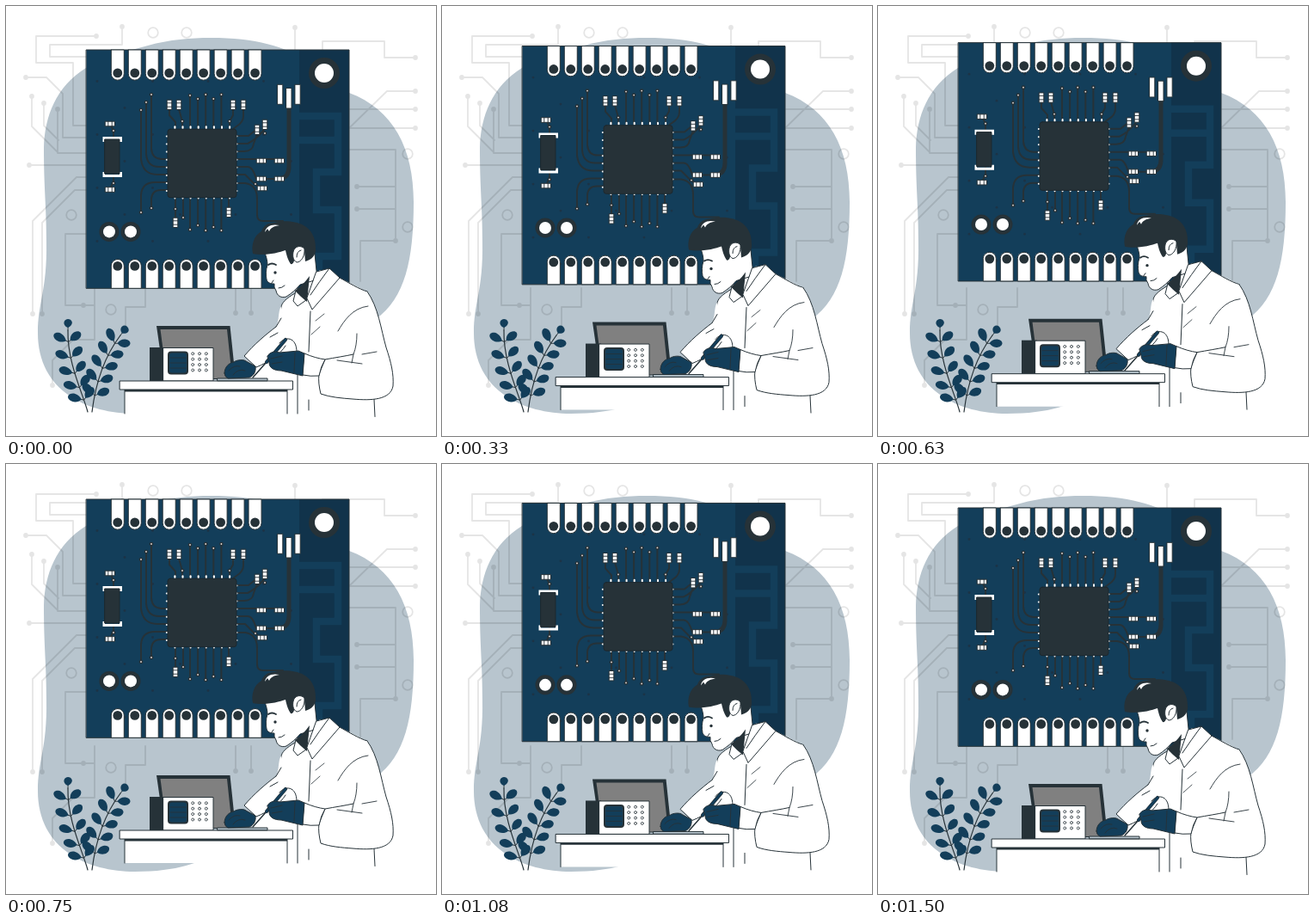
Write an HTML page with a canvas that moves like this. It is 500 by 500 pixels and loops after 1540 ms.

```html
<!DOCTYPE html>
<html lang="en">
<head>
<meta charset="utf-8">
<title>Electronics workbench</title>
<style>
html, body { margin: 0; width: 100%; height: 100%; overflow: hidden; background: #fff; }
canvas { display: block; width: 500px; height: 500px; }
</style>
</head>
<body>
<canvas id="stage" width="500" height="500"></canvas>
<script>
const INK = '#263238', NAVY = '#133e5a', DEEP = '#11334b', WHITE = '#fff';
const stage = document.getElementById('stage').getContext('2d');
let ctx = stage;

function shape(d, fill, stroke, width = 1) {
  const path = new Path2D(d);
  if (fill) { ctx.fillStyle = fill; ctx.fill(path); }
  if (stroke) {
    ctx.strokeStyle = stroke;
    ctx.lineWidth = width;
    ctx.stroke(path);
  }
}

const line = (d, color = INK, width = 1) => shape(d, null, color, width);

function box(x, y, w, h, fill, stroke, r = 0) {
  ctx.beginPath();
  ctx.roundRect(x, y, w, h, r);
  if (fill) { ctx.fillStyle = fill; ctx.fill(); }
  if (stroke) { ctx.strokeStyle = stroke; ctx.lineWidth = 1; ctx.stroke(); }
}

function dot(x, y, r, fill, stroke, width = 1) {
  ctx.beginPath();
  ctx.arc(x, y, r, 0, Math.PI * 2);
  if (fill) { ctx.fillStyle = fill; ctx.fill(); }
  if (stroke) { ctx.strokeStyle = stroke; ctx.lineWidth = width; ctx.stroke(); }
}

function layer(draw) {
  const canvas = document.createElement('canvas');
  canvas.width = canvas.height = 500;
  ctx = canvas.getContext('2d');
  ctx.lineJoin = ctx.lineCap = 'round';
  draw();
  ctx = stage;
  return canvas;
}

// Backdrop

function drawBlob() {
  shape(`M238 37C290 37 325 47 350 64C375 80 386 95 399 101C450 120 474 165 474 228
    C474 295 464 340 430 364C390 372 335 385 305 400C288 430 270 441 250 451
    C225 463 200 474 150 474C95 474 37 448 37 380C37 345 48 330 47 275
    C47 230 44 215 44 165C45 128 58 94 93 72C118 57 140 53 165 46C190 39 215 37 238 37Z`, '#b8c5ce');
}

function drawCircuit() {
  line(`M105 35H35V66H78V139H93M135 24V45H51V59H93M23 83H47L66 102V153H93
    M30 105V140L61 171H93M44 113V139L61 156M60 120V171M27 185H93
    M31 358V250L82 199H93M42 358V252L80 214H93M90 348H69V265H93
    M54 441V412L78 388H103V328M90 348H103M162 328V350H139V375`, '#000', 1.8);
  line(`M267 357V328M285 357V328M336 25V51M476 60H440V41H368V51
    M476 99H443L400 141M476 120H400M476 142H400M399 167H453V273H412V320
    M408 210H453M408 236H453`, '#000', 1.8);
  const ends = [[105, 35], [135, 24], [23, 83], [30, 105], [44, 113], [60, 120], [27, 185],
    [31, 358], [42, 358], [90, 348], [54, 441], [336, 25], [476, 60], [476, 99], [476, 120],
    [476, 142], [408, 210], [408, 236], [453, 273], [267, 357], [285, 357]];
  for (const [x, y] of ends) dot(x, y, 2.9, '#000');
  for (const [x, y] of [[171, 31], [210, 31], [76, 243], [122, 353], [467, 172], [467, 257]])
    dot(x, y, 5.8, null, '#000', 1.8);
}

function leaf(x, y, angle, length) {
  ctx.save();
  ctx.translate(x, y);
  ctx.rotate(angle);
  line('M0 0H4', INK, .9);
  ctx.translate(3, 0);
  ctx.scale(length / 16, 1);
  shape('M0 0C2 -3.5 6 -5.2 10 -4.8C14 -4.2 16 -2.2 16 0C15.5 3 12 5 8.5 4.6C5 4.3 2 2.6 0 0Z', NAVY);
  ctx.restore();
}

function drawBranch(p) {
  const at = (t, k) => (1 - t) ** 3 * p[0][k] + 3 * t * (1 - t) ** 2 * p[1][k]
    + 3 * t * t * (1 - t) * p[2][k] + t ** 3 * p[3][k];
  line(`M${p[0]}C${p[1]} ${p[2]} ${p[3]}`, INK, 1.2);
  for (let i = 0; i < 5; i++) {
    const t = .2 + i * .17, x = at(t, 0), y = at(t, 1);
    const heading = Math.atan2(at(t + .02, 1) - y, at(t + .02, 0) - x);
    leaf(x, y, heading - 1, 16);
    leaf(x, y, heading + 1, 15);
  }
  const [x, y] = p[3];
  leaf(x, y, Math.atan2(y - p[2][1], x - p[2][0]), 10);
}

// Circuit board

function cap(x, y, upright) {
  ctx.save();
  ctx.translate(x, y);
  if (upright) ctx.rotate(Math.PI / 2);
  box(-5.5, -2.8, 11, 5.6, WHITE, INK);
  line('M-2.2 -2.8V2.8M2.2 -2.8V2.8', INK, .9);
  ctx.restore();
}

function via(x, y) {
  dot(x, y, 2.3, INK);
  dot(x, y, .9, '#e8dcd8');
}

function drawPads() {
  for (let i = 0; i < 9; i++) {
    const x = 129.8 + i * 19.97;
    box(x - 7.5, 51, 15, 35.2, WHITE, INK, [0, 0, 7.5, 7.5]);
    dot(x, 77.9, 5.4, INK);
    box(x - 7.5, 294.5, 15, 33.8, WHITE, INK, [7.5, 7.5, 0, 0]);
    dot(x, 302.4, 5.4, INK);
  }
}

function drawTraces() {
  line(`M169 103V166Q170 178 181 178H187M163 112V172Q164 187 178 187H187
    M157 121V178Q159 196 176 196H187M157 240V220Q158 205 173 205H187
    M169 235V224Q170 214 180 214H187`, INK, 2);
  for (let i = 0; i < 5; i++) {
    const x = 214 + i * 9.1;
    const top = [104, 108, 103, 108, 103][i], bottom = [260, 255, 261, 257, 261][i];
    line(`M${x} ${top}V143M${x} 222V${bottom}`, INK, 2);
    via(x, top);
    via(x, bottom);
  }
  line(`M190 120V127L197 135V142M201 120L205 134V142M276 120V128Q276 135 268 140L264 143
    M264 120V127L260 134V142M268 169H277Q287 169 288 160L292 149M268 160H281Q290 156 301 143
    M268 151H282L292 143M268 178H318M268 187H281Q287 187 291 201H318M268 196H278L289 207L298 212
    M268 206H278Q292 208 292 224V243Q292 250 299 250H322
    M197 222V250M206 222V246M259 222V240M121 137L125 145V155M121 213L125 204V196`, INK, 2);
  line('M329 117V187Q329 199 319 201', INK, 5);
  for (const [x, y] of [[157, 121], [163, 112], [169, 103], [157, 240], [169, 235], [205, 134],
    [260, 134], [206, 246], [197, 236], [125, 145], [125, 206], [290, 207], [301, 148]]) via(x, y);
}

function drawChip() {
  for (let i = 0; i < 8; i++) {
    const p = 196.4 + i * 9.1, q = 151.4 + i * 9.1;
    box(p - 1, 139.3, 2, 4, WHITE, null, 1);
    box(p - 1, 221.5, 2, 3, WHITE, null, 1);
    box(185.8, q - 1, 3, 2, WHITE, null, 1);
    box(266.5, q - 1, 3, 2, WHITE, null, 1);
  }
  box(188, 143.2, 80, 79.5, INK, '#1d282e', 3);
}

function drawBoard() {
  box(93.5, 51, 305.5, 277.3, NAVY);
  box(341, 51, 58, 277.3, DEEP);
  ctx.lineJoin = 'miter';
  ctx.lineCap = 'butt';
  line('M341 128H386V193H361V237H386V291H364V320M341 156H386', NAVY, 8.5);
  ctx.lineJoin = ctx.lineCap = 'round';
  for (let row = 0; row < 8; row++)
    for (let x = row % 2 ? 138 : 106; x < 340; x += 64.5)
      dot(x, 87.5 + row * 31, 1.4, '#1c3346');
  box(93.5, 51, 305.5, 277.3, null, INK);
  drawPads();
  drawTraces();
  drawChip();

  dot(370, 78, 18, INK);
  dot(370, 78, 11, WHITE);
  for (const x of [120, 145]) {
    dot(x, 262.4, 11.5, INK);
    dot(x, 262.4, 7, WHITE);
  }

  shape('M112.5 158V152H135V158H132V155H115V158ZM112.5 193V199H135V193H132V196H115V193Z', WHITE);
  box(115, 155, 17, 40, INK, '#1d282e');
  for (const [x, y] of [[121, 137], [121, 213.5], [297, 180], [318, 180], [297, 201],
    [318, 201], [298, 212]]) cap(x, y);
  for (const [x, y] of [[190, 115], [201, 115], [264, 115], [276, 115], [292, 144],
    [301, 138], [197, 252], [259, 240]]) cap(x, y, true);

  box(315.8, 91.3, 6, 23, WHITE, INK);
  box(326, 95.5, 6, 23.5, WHITE, INK);
  box(336.2, 91.3, 6, 23, WHITE, INK);
}

// Person and bench

function drawHead() {
  shape(`M301 287C303 292 304 297 304 301C302 307 302 313 303 318C304 322 308 323 312 323
    L312 327L314 331C315 337 320 340 326 338C332 334 337 330 342 324
    L362 318L359 288L338 270Z`, WHITE, INK);
  shape(`M287 288C285 278 288 267 297 262C299 256 304 252 312 252C322 249 337 250 346 255
    C355 260 360 269 360 281C361 289 356 295 348 297L347 285C342 282 336 285 335 291
    C336 296 334 301 331 300C328 296 326 289 325 284C317 287 299 291 287 288Z`, INK);
  shape('M301 263C302 256 309 253 318 255C311 256 308 258 306 262L304 259Z', WHITE);
  shape(`M347 282C342 277 335 280 334 286C333 291 334 296 338 298C343 298 348 291 347 282Z`, WHITE, INK);
  line('M343 284Q338 285 338 292');
  line('M305 301Q309 298 314 301', INK, 1.8);
  dot(313, 310, 1.7, INK);
  line('M317 328Q321 328 324 325M309 322L311 319');
}

function drawBody() {
  shape(`M336 334C326 340 320 345 320 351C318 374 323 388 291 418L285 434L328 436V478H428L427 456
    L446 440L421 333C410 327 398 321 388 316L365 307Z`, WHITE);
  line('M339 428V474M352 458L352 470M354 355L352 402M428 457L429 477.5');
  line('M336 334C326 340 320 345 320 351C321 363 324 372 325 387');
  line('M388 316C399 322 410 329 420 332');
  drawHead();
  shape('M337 331L334 343L339 349L349 342Z', WHITE, INK);
  shape('M336 331Q345 325 353 314L350 344L343 338Z', INK);
  shape('M361 309L376 305L388 316L356 353L350 340Z', WHITE, INK);
  line('M376 305Q364 321 354 336');
  line('M322 362L316 378M320 378L319 390M355 382L365 373M370 358L360 366', INK, .8);
}

function drawDesk() {
  shape('M175 372H260.5L267 434H184Z', INK);
  shape('M179.5 376H257L263 433H187Z', '#808080');
  box(167, 397, 18, 39, INK);
  box(183, 397.5, 58, 38.5, WHITE, INK);
  box(188, 401.5, 24, 27, INK, null, 4);
  box(190, 403.5, 20, 23, NAVY, null, 3);
  line('M191 409H209M191 415H209M191 421H209', INK, .8);
  for (let row = 0; row < 4; row++)
    for (let col = 0; col < 3; col++)
      dot(217.2 + col * 7.8, 404.3 + row * 6.4, 1.5, WHITE, INK, .8);
  box(138, 446, 189, 28, WHITE);
  line('M138 474V446M327 446V474');
  box(138, 446, 189, 2.4, INK);
  box(132.5, 436, 201, 10, WHITE, INK);
  box(246, 433, 58, 2.8, '#b8c5ce', INK);
}

function drawArms() {
  shape(`M320 349C316 355 318 366 314 373C302 382 288 394 277 407
    L291 420C306 414 319 405 326 394L326 372Z`, WHITE);
  line('M314 373C302 382 288 394 277 407L291 420C306 414 319 405 325 395M314 373L320 363M307 385L316 380');
  shape(`M254 427C254 420 259 415 265 414C269 411 277 411 279 413L290 419
    C291 425 288 430 283 432L258 433Q254 431 254 427Z`, NAVY, INK);
  line('M259 424Q265 417 272 419M264 429Q270 421 278 424', INK, .9);

  shape(`M420 332C433 350 436 376 442 397C448 415 451 428 450 442
    C447 458 425 459 403 457C390 456 377 455 366 451L364 428L371 411
    C382 409 395 407 404 405L389 352L400 332Z`, WHITE);
  line(`M420 332C433 350 436 376 442 397C448 415 451 428 450 442C447 458 425 459 403 457
    C390 456 377 455 366 451C364 443 363 435 364 428L371 411C382 409 395 407 404 405`);
  line('M421 349C403 351 393 366 386 378M408 381Q408 395 404 405L402 415M385 412L414 416M414 405L431 402', INK, .9);
  shape('M347 404C356 408 364 410 371 411Q366 419 364 430Q354 431 345 429Z', WHITE, INK);

  line('M318 392C324 384 338 384 338 402');
  line('M303 414L287 432', INK, 1.5);
  line('M325 388L303 414', INK, 4.2);
  line('M325 388L303 414', NAVY, 2.8);
  shape(`M304 407C307 402 313 401 318 403L340 401L347 404L345 430L320 424
    C312 424 306 421 306 415Z`, NAVY, INK);
  line('M308 410L321 407M309 416L321 414M336 403L335 426', INK, .9);
}

const circuit = layer(drawCircuit);
const backdrop = layer(() => {
  drawBlob();
  ctx.globalAlpha = .1;
  ctx.drawImage(circuit, 0, 0);
  ctx.globalAlpha = 1;
  drawBranch([[95, 472], [90, 452], [71, 415], [72, 377]]);
  drawBranch([[100, 472], [104, 440], [114, 408], [133, 383]]);
});

function drawFloating() {
  drawBoard();
  drawBody();
  drawDesk();
  drawArms();
}

// 24 steps per second: up 10 px and back in 36 steps, with a short rest before the loop
const LOOP = 1540, STEPS = 36;

function render(now) {
  const step = Math.min(STEPS, Math.floor((now % LOOP + 4.9) * 24 / 1000));
  const lift = 10 * (1 - Math.abs(1 - 2 * step / STEPS));
  ctx.lineJoin = ctx.lineCap = 'round';
  ctx.clearRect(0, 0, 500, 500);
  ctx.drawImage(backdrop, 0, 0);
  ctx.save();
  ctx.translate(0, -lift);
  drawFloating();
  ctx.restore();
}

let start;
function tick(now) {
  start ??= now;
  render(now - start);
  requestAnimationFrame(tick);
}
render(0);
requestAnimationFrame(tick);
</script>
</body>
</html>
```
